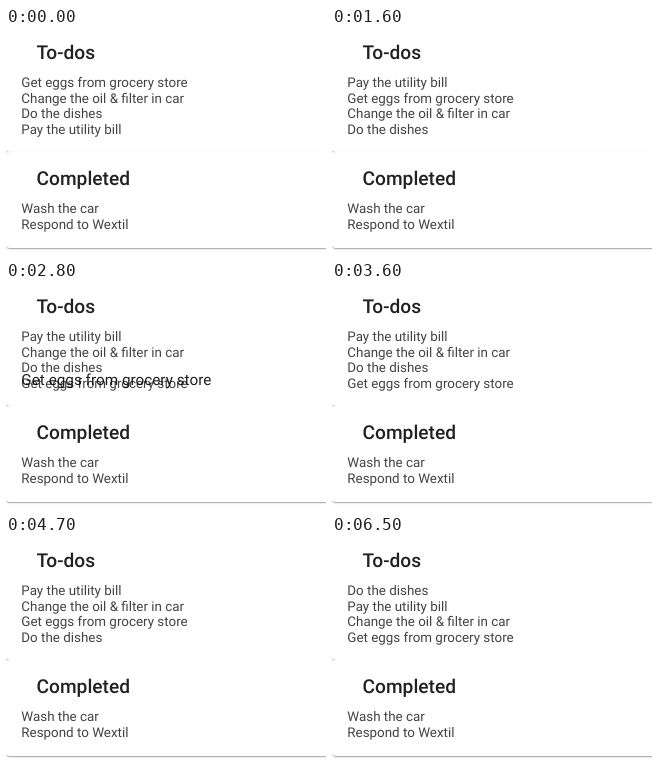
Recreate the animation shown at these times as an HTML page. Size 320 by 226 pixels, loop 7.1 s.

```html
<!DOCTYPE html>
<html lang="en">
<head>
<meta charset="utf-8">
<title>To-dos</title>
<style>
  html, body { margin: 0; width: 100%; height: 100%; overflow: hidden; background: #fff; }
  body { position: relative; }
  .card {
    position: absolute; left: 0; width: 326px; border-radius: 4px; background: #fff;
    box-shadow: 0 2px 1px -1px rgba(0,0,0,.16), 0 1px 1px rgba(0,0,0,.14), 0 1px 3px rgba(0,0,0,.1);
  }
  svg { position: absolute; left: 0; top: 0; width: 320px; height: 226px; }
  text { font-family: Roboto, Arial, sans-serif; text-rendering: geometricPrecision; white-space: pre; }
  .title { font-size: 19.14px; font-weight: 500; fill: rgba(0,0,0,.87); }
  .item { font-size: 13.4px; fill: rgba(0,0,0,.74); }
  .preview { font-size: 15.31px; fill: rgba(0,0,0,.87); }
</style>
</head>
<body>
<div class="card" style="top:-1px;height:125px"></div>
<div class="card" style="top:124px;height:96px"></div>
<svg id="stage" viewBox="0 0 320 226"></svg>
<script>
const LOOP = 7100, TICK = 100;
const LEFT = 15.3, PITCH = 15.62, BASE = 59.2, LIST_TOP = 46.7;
const todos = ['Get eggs from grocery store', 'Change the oil & filter in car', 'Do the dishes', 'Pay the utility bill'];
const done = ['Wash the car', 'Respond to Wextil'];

// keys: [time, baseline] of the dragged text; drift: how far it slips right.
const drags = [
  { item: 3, drop: 1100, drift: 1, keys: [[100, 107.8], [600, 36.3], [800, 48.3]] },
  { item: 0, drop: 3300, drift: 0, keys: [[2500, 76.5], [2800, 103], [3100, 116.5]] },
  { item: 2, drop: 4700, drift: 0.6, keys: [[4100, 92.1], [4600, 108]] },
  { item: 2, drop: 6500, drift: 3.6, keys: [[5500, 107.8], [5700, 81.3], [6000, 54.3], [6100, 54.3], [6400, 49.3]] }
];

const stage = document.getElementById('stage');

function addText(cls, str, x, y) {
  const el = document.createElementNS('http://www.w3.org/2000/svg', 'text');
  el.setAttribute('class', cls);
  el.textContent = str;
  place(el, x, y);
  stage.append(el);
  return el;
}

function place(el, x, y) {
  el.setAttribute('x', x);
  el.setAttribute('y', y);
}

function along(keys, t) {
  const i = keys.findIndex(k => k[0] > t);
  if (i < 0) return keys[keys.length - 1][1];
  const [t0, y0] = keys[i - 1], [t1, y1] = keys[i];
  return y0 + (y1 - y0) * (t - t0) / (t1 - t0);
}

// The row under the pointer, which sits midway up the dragged text.
const rowAt = y => Math.max(0, Math.min(3, Math.floor((y - 5 - LIST_TOP) / PITCH)));

addText('title', 'To-dos', 2 * LEFT, 31);
addText('title', 'Completed', 2 * LEFT, 157.2);
done.forEach((s, i) => addText('item', s, LEFT, 185.3 + i * PITCH));
const rows = todos.map(s => addText('item', s, LEFT, 0));
const preview = addText('preview', '', 0, 0);

function draw(time) {
  const t = Math.floor(time % LOOP / TICK) * TICK;
  const order = todos.map((_, i) => i);
  let held = '';
  for (const { item, drop, drift, keys } of drags) {
    const since = t - keys[0][0];
    if (since < 0) break;
    const y = along(keys, t);
    order.splice(order.indexOf(item), 1);
    order.splice(rowAt(y), 0, item);
    if (t < drop) {
      held = todos[item];
      place(preview, LEFT + drift * Math.min(1, since / 200), y);
    }
  }
  preview.textContent = held;
  order.forEach((id, i) => place(rows[id], LEFT, BASE + i * PITCH));
}

const start = performance.now();
function loop() {
  draw(performance.now() - start);
  requestAnimationFrame(loop);
}
loop();
</script>
</body>
</html>
```
